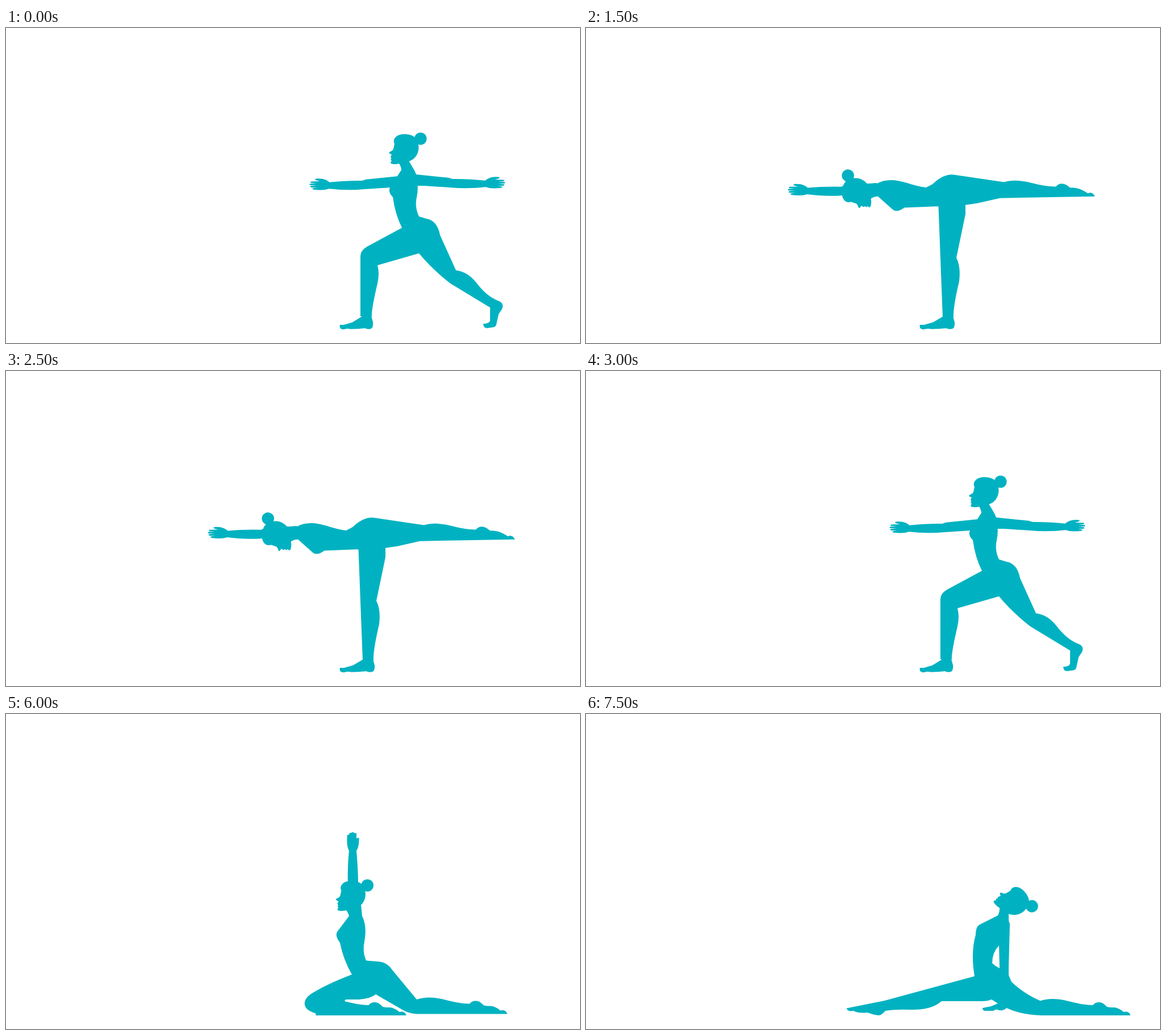
An HTML page for the animation above (8 s loop, 1009x555 px).

```html
<!DOCTYPE html>
<html lang="en">
<head>
<meta charset="utf-8">
<title>Yoga flow</title>
<style>
  html, body { margin: 0; width: 100%; height: 100%; overflow: hidden; background: #fff; }
  svg { display: block; width: 100%; height: 100%; fill: #00b2c1; }

  /* Each pose is visible for one beat, starting at --t. */
  .pose { visibility: hidden; animation: beat 8s step-end var(--t) infinite; }
  .hold { animation-name: hold; }
  @keyframes beat { 0% { visibility: visible; } 6.25%, 100% { visibility: hidden; } }
  @keyframes hold { 0% { visibility: visible; } 25%, 100% { visibility: hidden; } }
</style>
</head>
<body>
<svg viewBox="0 0 1009 555">
  <defs>
    <!-- Shared parts -->
    <g id="head">
      <circle cx="728.7" cy="195" r="10.8"/>
      <path d="M683 204 C679 197 685 187 700 187 C708 187 715 189 719 193 C723 197 725.500 205 725.500 211
        C725 223 718 232 708 235 L691 239 Q683 241 677 239 Q675 237 678 234 L676 232 L677.500 230 L676 227
        L678 223 L674 221 Q672.500 219.500 675 218 Q680 216 681 213 Z"/>
    </g>
    <g id="arm">
      <path d="M690 261 L636 266.500 Q630 267 627 269 Q600 268.500 566 272 V283 Q600 287 630 284 L676 281 L692 281 Z"/>
      <path d="M568 271 L562 267.500 Q555 264.500 545 265.500 Q541 267 546 268.500 L552 270 Q544 270 536 270.500
        Q534 272 537 273 L546 273.500 L535 274.200 Q532 275.500 535 277 L546 277 L536 278.200 Q533 279.500 537 281
        L547 281 L540 282 Q537 283.500 540 284.600 Q558 287 568 283 Z"/>
    </g>
    <use id="backArm" href="#arm" transform="matrix(-1 0 0 1 1411 -3)"/>
    <path id="foot" d="M626 508 L609 518.500 L594 523 H587 Q585 531 594 531 Q600 529 606 530.500
      Q620 530 631 529 Q638 532 643 529 Q646 525 645 518 L642 507 Z"/>
    <use id="wideFoot" href="#foot" transform="translate(-29.35) scale(1.05 1)"/>
    <path id="shin" d="M722 503 C735 499 748 498 770 503 C790 508 800 510 815 510.500 C818 506 823 505 827 505.500
      C833 506 836 510 840 513.500 C846 515 851 514 856 515 C862 517 866 520 869 522.500
      C873 521 880 522 881 528.500 H722 Z"/>

    <!-- High lunge -->
    <g id="lungeBase">
      <use href="#head"/>
      <use href="#arm"/>
      <use href="#foot"/>
      <path d="M690 237 Q695 245 695 250 L688 261 L675 281 Q671 289 680 298 Q684 328 696 352 L635 385
        Q623 392 623 402 V508 H643 Q642 497 653 450 Q657 432 653 418 L726 397 Q748 424 781 450 L851 492.500
        V515 Q850 521 839 521 Q839 530 848 528.500 L858 527 Q861 526 862 522 L866 504 L872 495
        Q876 485 866 481 Q845 473 827 449 Q811 429 791 427 L763 365 Q758 339 739 336 L726 332
        Q718 316 722 298 Q726 280 721 258 L718 251 L708 234 Z"/>
    </g>
    <g id="lunge"><use href="#lungeBase"/><use href="#backArm"/></g>
    <g id="lungeArmDown"><use href="#lungeBase"/><use href="#backArm" transform="rotate(49 722 268)"/></g>

    <!-- Standing balance -->
    <g id="leanUpper">
      <use href="#head" transform="translate(-192 24) rotate(-59 674 219)"/>
      <use href="#arm" transform="translate(-149.500 -116) rotate(27 533 275)"/>
      <path d="M513 211 L529 219 Q552 217 576 240 Q590 254 604 263 L640 262 V318 L619 309 L606 301 L554 278
        Q538 281 534 272 L521 240 Q516 237 507 238 Z"/>
    </g>
    <path id="leanLeg" d="M604 263 L618 259 Q645 253 659 266 L726 319 Q747 324 770 347 Q786 363 801 371.500
      Q816 367 822 386 Q835 391 844 410 Q853 411 852 421 L706 340 L667 328 L619 309 Z"/>
    <g id="stand">
      <path d="M619 300 H667 V328 L651 405 Q659 420 656 446 Q645 493 646 510 H627 Z"/>
      <use href="#wideFoot"/>
    </g>
    <g id="lean"><use href="#leanUpper"/><use href="#leanLeg"/><use href="#stand"/></g>
    <g id="level">
      <use href="#leanUpper" transform="rotate(-26 640 285)"/>
      <use href="#leanLeg" transform="translate(3) rotate(-30 640 285)"/>
      <use href="#stand"/>
    </g>

    <!-- Dancer -->
    <g id="dancer">
      <use href="#head" transform="translate(-123 -40) rotate(3 676 225)"/>
      <use href="#foot"/>
      <path d="M579 152 Q582 142 590 139 Q612 126 633 122 Q632 119 642 118.500 Q650 118 658 122 Q668 125.500 675 126
        L681 129 V134 L658 133 Q650 135 641 134 L616 149.500 L603 168 L585 170 Z"/>
      <path d="M566 197 Q574 204 574 212 L566 232 Q557 246 570 262 Q592 297 619 315 L625 508 H642
        Q643 493 651 455 Q656 430 647 409 L663 338 L664 326 Q700 325 740 302 Q772 283 769 266
        Q765 238 717 171 Q706 150 682 127 L680 133 Q684 136 685 146 Q687 154 692 160 Q688 180 703 181
        Q712 196 719 222 Q725 246 740 261 Q698 279 671 279 Q653 268 635 277 L624 277
        Q613 265 612 246 Q610 226 604 214 L603 165 Z"/>
    </g>

    <!-- Low lunge -->
    <g id="kneel">
      <use href="#head" transform="translate(5.800 74)"/>
      <use href="#arm" transform="matrix(1.06 -.02 0 1 -34.3 87.7)"/>
      <use href="#arm" transform="matrix(-1.05 -.0255 0 1 1452.5 87.6)"/>
      <use href="#wideFoot"/>
      <use href="#shin" transform="translate(47.100 1) scale(1.04 1)"/>
      <path d="M695 311 Q702 320 702 325 L695 335 L678 356 Q676 366 685 375 Q687 390 694 404 Q664 394 643 392.500
        Q627 393 625 409 V510 H646 Q647 490 652 465 Q656 445 653 429 Q700 460 728 464 Q745 491 764 514
        Q777 531 792 532 H895 V512 L798 503 L777 440 Q770 416 747 411 L733 406 Q725 390 730 374
        Q733 358 731 352 L728 333 L724 325 L714 310 Z"/>
    </g>

    <!-- Seated poses -->
    <g id="seatedTorso">
      <use href="#head" transform="translate(-93.500 107)"/>
      <path d="M597 344 Q602 351 603 356 L582 384 Q578 391 587 403 Q593 433 608 459 L640 470 L653 436
        Q645 437 633 434.500 Q626 418 630 401 Q635 374 626 356 L624 336 Z"/>
    </g>
    <path id="raisedArm" d="M601 300 Q600 270 603 241 Q598 232 600 213 L603 212.500 L604 209.500 L607 209.500
      Q609 206.500 612 209.500 L616 210 V219 L620.500 218 Q621 234 616 241 Q619 275 619 300 Z"/>
    <g id="seatedLegs">
      <use href="#shin"/>
      <use href="#shin" transform="translate(-177.500 2.500)"/>
      <path d="M608 459 Q561 477 535 494 Q524 502 525 512 Q526 521 540 526 Q553 531 580 531 L597 503 H620
        Q639 502 650 494 L695 520 Q708 528 722 528.500 V503 L679 451 Q670 437 653 436 L633 434.500 Z"/>
    </g>
    <g id="sink">
      <g transform="translate(59 -7)"><use href="#seatedTorso"/><use href="#raisedArm"/></g>
      <use href="#wideFoot"/>
      <use href="#shin" transform="translate(59 2)"/>
      <path d="M692 427 L712 429 Q729 431 738 444 L781 503 V530.500 Q766 530 752 518 L709 487
        Q675 474 645 440 Q655 462 646 510 H627 L606 420 Q602 403 619 402 Q650 408 680 425 Z"/>
    </g>
    <g id="pigeon"><use href="#seatedTorso"/><use href="#raisedArm"/><use href="#seatedLegs"/></g>
    <g id="pigeonRest">
      <use href="#seatedTorso"/>
      <use href="#seatedLegs"/>
      <path d="M603 362 H626 L624 440 L619 506 L604 512 L606 440 Z"/>
    </g>

    <!-- Split -->
    <g id="split">
      <use href="#head" transform="translate(55 96) rotate(47 674 219)"/>
      <use href="#shin" transform="translate(76 2.500)"/>
      <path fill-rule="evenodd" d="M727 336 Q728 348 724 355 L692 371 Q685 375 685 389 Q676 420 683 462 L525 505
        L458 518.500 Q460 525 470 523 Q480 528 495 526 Q505 530 514 531 Q521 530 526 523 Q545 520 570 521
        Q607 522 625 506 H697 Q706 506 713 503 L724 510 L712 515 L697 518 Q697 523 702 523 H716
        Q721 519 726 522 Q735 523 739 518 Q765 530 802 531 L798 505 Q770 493 748 472 L743 460 V447
        L745 370 L743 364 V350 Z M726 408 Q714 420 714 439 Q720 445 727 448 Z"/>
    </g>
  </defs>

  <use class="pose" href="#lunge" style="--t:0s"/>
  <use class="pose" href="#lungeArmDown" style="--t:.5s"/>
  <use class="pose" href="#lean" style="--t:1s"/>
  <use class="pose" href="#level" style="--t:1.5s"/>
  <use class="pose" href="#dancer" style="--t:2s"/>
  <use class="pose" href="#level" style="--t:2.5s"/>
  <use class="pose hold" href="#lunge" style="--t:3s"/>
  <use class="pose" href="#kneel" style="--t:5s"/>
  <use class="pose" href="#sink" style="--t:5.5s"/>
  <use class="pose" href="#pigeon" style="--t:6s"/>
  <use class="pose" href="#pigeon" style="--t:6.5s" transform="translate(-1 -1.500)"/>
  <use class="pose" href="#pigeonRest" style="--t:7s"/>
  <use class="pose" href="#split" style="--t:7.5s"/>
</svg>
</body>
</html>
```
